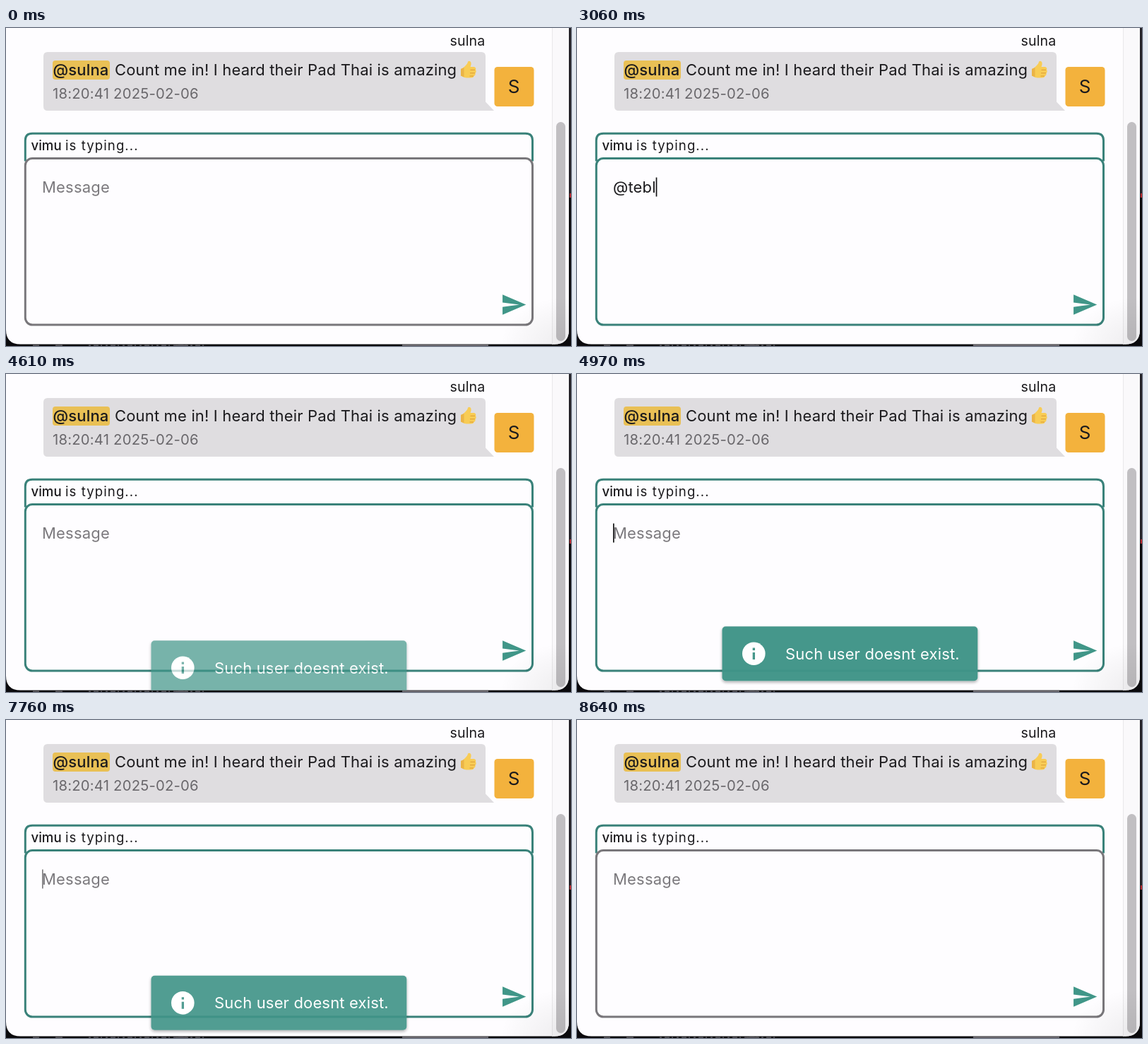
Write an HTML page that moves like this. It is 800 px wide and 450 px high and loops after 8670 ms.

```html
<!DOCTYPE html>
<html lang="en">
<head>
<meta charset="utf-8">
<title>Chat box</title>
<style>
  html, body { margin: 0; width: 100%; height: 100%; overflow: hidden; background: #0b0a0d; }
  svg { display: block; width: 800px; height: 450px; }
  text { font-family: Inter, Roboto, sans-serif; font-size: 22px; letter-spacing: .16px; fill: #1b1a1d; white-space: pre; }
  .name { font-size: 19.6px; text-anchor: end; }
  .stamp { font-size: 20.3px; letter-spacing: .2px; fill: #69676b; }
  .who { font-size: 18.6px; font-weight: 500; letter-spacing: 0; }
  .typing { font-size: 18.6px; letter-spacing: 1.07px; }
  .hint { letter-spacing: .2px; fill: #7b797d; }
  .initial { font-size: 26px; text-anchor: middle; letter-spacing: 0; }
  .toast { fill: #fff; }
</style>
</head>
<body>
<svg viewBox="0 0 800 450">
  <defs>
    <clipPath id="window"><path d="M0 0H797V427Q797 447.500 776.500 447.500H20.500Q0 447.500 0 427Z"/></clipPath>
    <filter id="shadow" x="-10%" y="-20%" width="120%" height="150%">
      <feDropShadow dx="0" dy="2" stdDeviation="2" flood-opacity=".35"/>
    </filter>
    <radialGradient id="shade" cx="1" cy="1" r="1">
      <stop stop-opacity=".07"/>
      <stop offset="1" stop-opacity="0"/>
    </radialGradient>
  </defs>

  <!-- desktop behind the window -->
  <rect width="800" height="450" fill="#0b0a0d"/>
  <rect x="797" width="3" height="240" fill="#232127"/>
  <path d="M38 449.300H47M70 449.300H80M240 449.300H258" stroke="#5d5b60" stroke-width="1.500"/>
  <path d="M117 449.300H280" stroke="#55535a" stroke-width="1.500" stroke-dasharray="3 4 7 3 2 5"/>
  <path d="M561 449H683" stroke="#66646a" stroke-width="2"/>
  <path d="M799 234V240" stroke="#b3262d" stroke-width="2"/>

  <g clip-path="url(#window)">
    <rect width="797" height="450" fill="#fefdff"/>
    <rect x="773" width="24" height="450" fill="#faf9fb"/>
    <path d="M773.500 0V450" stroke="#e9e8ea"/>
    <rect x="779" y="133" width="13" height="310" rx="6.500" fill="#c1bfc2"/>

    <text class="name" x="678.500" y="25">sulna</text>
    <path d="M59 34H673Q679 34 679 40V104.500L691 117H59Q53 117 53 111V40Q53 34 59 34Z" fill="#dfdde0"/>
    <rect x="66" y="46" width="81" height="27" rx="4" fill="#e9c055"/>
    <text x="66.500" y="67" font-weight="500">@sulna</text>
    <text x="154" y="67">Count me in! I heard their Pad Thai is amazing</text>
    <text class="stamp" x="66" y="100">18:20:41 2025-02-06</text>
    <g stroke-linejoin="round" transform="translate(-1 0)">
      <path d="M645 58Q648 57 651 54Q655 50 655 47.500Q658 45.500 659.500 49Q660 52 658.500 55H664Q667 56 666 59Q667.500 62 665.500 64Q666 67 663.500 68Q663 70.500 659 70.500H653Q649 70 645 67.500Z" fill="#f8cc55"/>
      <path d="M658.500 59.300H665M658 63.800H665M657.500 68H663" fill="none" stroke="#dc9c36"/>
      <path d="M645 58V67.500L649.500 69.500V56Z" fill="#eab447"/>
    </g>
    <rect x="691.500" y="55" width="56" height="56" rx="4.500" fill="#f3b23d"/>
    <text class="initial" x="719" y="92">S</text>

    <path d="M27.300 188.500V159Q27.300 149.300 37.300 149.300H735.500Q745.500 149.300 745.500 159V188.500" fill="#fefdff" stroke="#3a827a" stroke-width="3"/>
    <text class="who" x="35.500" y="173">vimu</text>
    <text class="typing" x="84" y="173">is typing...</text>
    <rect id="box" x="27.300" y="184.500" width="718.200" height="235.500" rx="10" fill="#fefdff" stroke-width="3"/>
    <text class="hint" id="hint" x="51" y="233">Message</text>
    <text id="draft" x="51" y="233"></text>
    <rect id="caret" y="211.500" width="1.700" height="27" fill="#151416"/>
    <path d="M2.010 21L23 12 2.010 3 2 10l15 2-15 2z" transform="translate(699.900 372.600) scale(1.580)" fill="#409688"/>
    <rect x="700" y="380" width="97" height="68" fill="url(#shade)"/>

    <g id="toast">
      <rect x="205.500" y="355" width="361.800" height="77" rx="5" fill="#419488" filter="url(#shadow)"/>
      <circle cx="250.300" cy="393.500" r="16.300" fill="#fff"/>
      <path d="M248.700 385.300h3.300v3.300h-3.300zM248.700 391.800h3.300v10h-3.300z" fill="#419488"/>
      <text class="toast" x="295" y="401.500">Such user doesnt exist.</text>
    </g>
  </g>

  <path id="mouse" d="M0 0V21.500L4.800 17.100 8.200 25.200 12 23.600 8.700 15.700H15.200Z" fill="#0a0a0a" stroke="#fff" stroke-width="1.500" stroke-linejoin="round"/>
</svg>

<script>
const LOOP = 8670;
const FOCUS = 800, BLUR = 8550;
const SENT = 4120, TOAST_IN = 4190, TOAST_OUT = 7665;
const MOUSE_IN = 30, MOUSE_STOP = 480, MOUSE_HIDE = 1700;
const KEYS = [[1740, '@'], [2050, 't'], [2250, 'e'], [2750, 'b'], [2950, 'l'], [3110, 'o'], [3450, 'k'], [3650, 'a']];
const GREY = [121, 119, 123], TEAL = [58, 130, 122];

const $ = id => document.getElementById(id);
const [box, hint, draft, caret, toast, mouse] = ['box', 'hint', 'draft', 'caret', 'toast', 'mouse'].map($);

const part = (t, from, length) => Math.min(1, Math.max(0, (t - from) / length));
const mix = (a, b, k) => a + (b - a) * k;
const show = (el, on) => el.setAttribute('opacity', +on);

// cubic-bezier(.25, .1, .25, 1)
function ease(x) {
  const at = (u, a, b) => 3 * (1 - u) ** 2 * u * a + 3 * (1 - u) * u * u * b + u ** 3;
  let lo = 0, hi = 1;
  for (let i = 0; i < 24; i++) {
    const mid = (lo + hi) / 2;
    if (at(mid, .25, .25) < x) lo = mid; else hi = mid;
  }
  return x <= 0 ? 0 : x >= 1 ? 1 : at(lo, .1, 1);
}

// Soft blink: on, fade out, off, fade in
function blink(t) {
  const p = ((t - 830) % 1000 + 1000) % 1000;
  return 1 - part(p, 500, 150) + part(p, 850, 150);
}

function render(t) {
  const focus = ease(part(t, FOCUS, 360)) * (1 - part(t, BLUR, 80));
  box.setAttribute('stroke', `rgb(${GREY.map((c, i) => mix(c, TEAL[i], focus))})`);

  const typed = t < SENT ? KEYS.filter(k => k[0] <= t).map(k => k[1]).join('') : '';
  if (draft.textContent !== typed) draft.textContent = typed;
  show(hint, !typed);
  caret.setAttribute('x', 51 + (typed ? draft.getComputedTextLength() : 0));
  show(caret, t >= FOCUS && t < BLUR ? blink(t) : 0);

  const up = ease(part(t, TOAST_IN, 1000)) - ease(part(t, TOAST_OUT, 1000));
  show(toast, up);
  toast.setAttribute('transform', `translate(0 ${77 * (1 - up)})`);

  const move = ease(part(t, MOUSE_IN, MOUSE_STOP - MOUSE_IN));
  mouse.setAttribute('transform', `translate(${mix(800, 536, move)} ${mix(380, 213.5, move)})`);
  show(mouse, t >= MOUSE_IN && t < MOUSE_HIDE);
}

const start = performance.now();
function tick() {
  render((performance.now() - start) % LOOP);
  requestAnimationFrame(tick);
}
tick();
</script>
</body>
</html>
```
